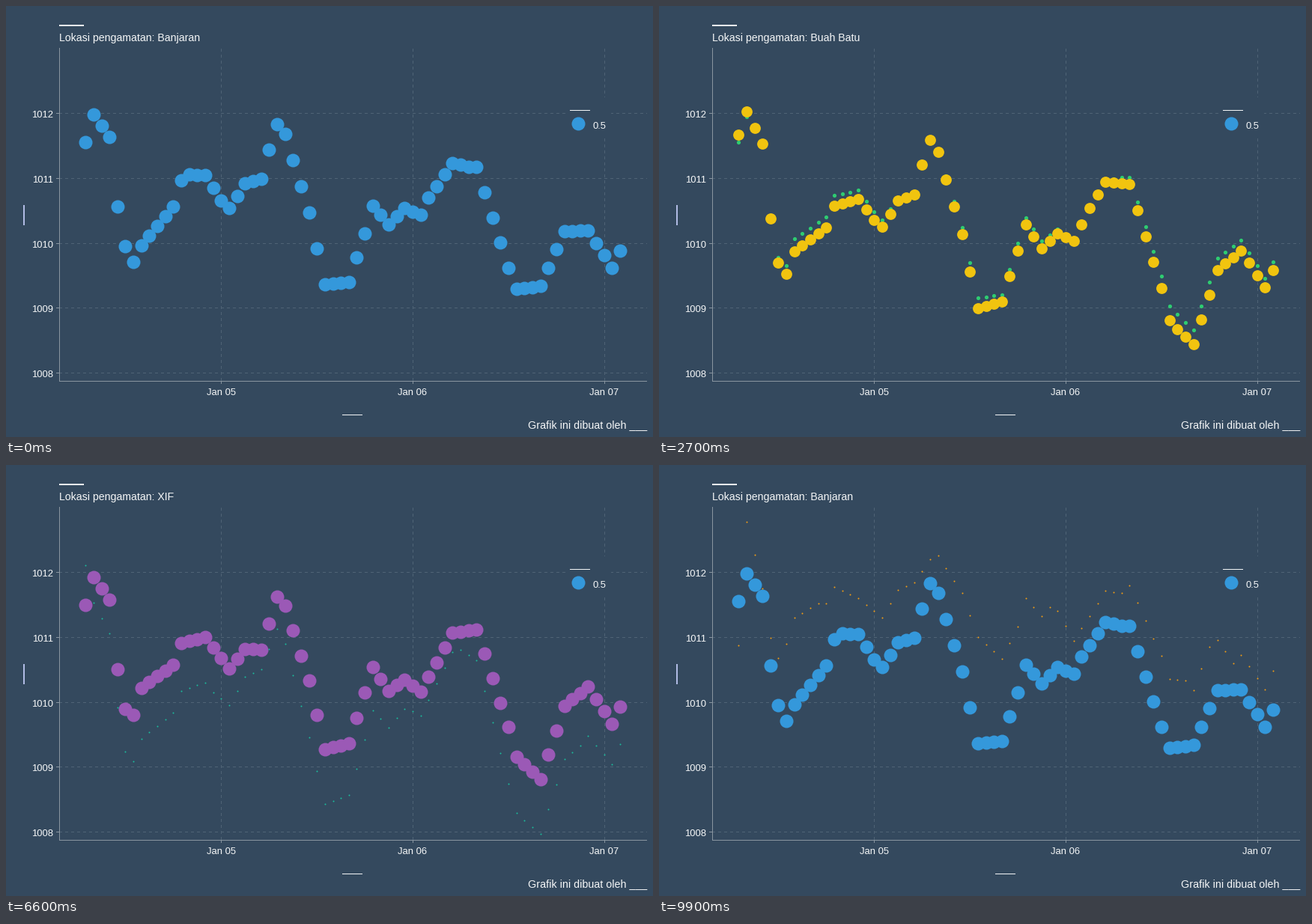
Animation of 864 by 576 pixels, one loop 10000 ms. Source, as a matplotlib script:

```python
import numpy as np
import matplotlib.pyplot as plt
from matplotlib.animation import FuncAnimation
from matplotlib.patches import Rectangle

plt.rcParams["font.family"] = "Liberation Sans"

W, H = 864, 576
FRAMES, STEP = 100, 100
STARTS = [8, 23, 38, 52, 66, 80, 94]  # first frame of each change
CHANGE = 6                            # frames per change
DOT, FULL = 2, 18                     # marker diameters

BG, INK, GRID, AXIS = "#34495e", "#f4f6f7", "#4f6375", "#8995a0"
BLUE = "#3498db"

# Daily pressure swing shared by all stations: hour -> height on the stage
SWING = {0: 187, 1: 150, 3: 180, 4: 273, 5: 326, 6: 334, 7: 298, 11: 267,
         12: 238, 15: 230, 18: 272, 20: 246, 22: 247, 24: 176, 25: 188,
         28: 288, 30: 380, 33: 372, 36: 270, 38: 302, 40: 287, 42: 303,
         46: 224, 49: 220, 53: 350, 54: 390, 57: 420, 60: 322, 63: 296,
         66: 346, 67: 323}

# Name, colour and slow drift away from the shared swing
STATIONS = [
    ("Banjaran", BLUE, {0: -5, 5: -5, 7: 22, 13: -10, 17: 2, 23: -20, 35: 0,
                        43: -27, 48: -6, 53: 0, 57: -46, 63: 4}),
    ("Braga", "#2ecc71", {0: -5, 6: 13, 17: 17, 23: 2, 33: 14, 48: 8, 67: 19}),
    ("Buah Batu", "#f1c40f", {0: -15, 7: 30, 17: 28, 23: 0, 30: 24, 38: 22,
                              44: 6, 55: 32, 67: 30}),
    ("Dago", "#e74c3c", {0: -11}),
    ("XIF", "#9b59b6", {0: 0}),
    ("Lanud", "#1abc9c", {0: -53, 1: 34, 7: 68, 16: 60, 22: 26, 28: 76,
                          34: 68, 41: 34, 47: 24, 53: 76, 62: 70, 67: 50}),
    ("Lembang", "#f39c12", {0: 54, 1: -74, 3: -15, 6: -95, 10: -90, 15: -52,
                            22: -90, 24: -50, 30: -150, 35: -88, 39: -104,
                            42: -68, 48: -50, 56: -122, 59: -112, 62: -40,
                            67: -48}),
]

hours = np.arange(68)


def curve(keys):
    return np.interp(hours, list(keys), list(keys.values()))


def place(drift):
    x = 106.2 + 10.655 * hours
    return np.round(np.column_stack([x, curve(SWING) + curve(drift)]))


points = [place(drift) for _, _, drift in STATIONS]

fig = plt.figure(figsize=(W / 72, H / 72), dpi=72, facecolor=BG)
ax = fig.add_axes([0, 0, 1, 1])
ax.set(xlim=(0, W), ylim=(H, 0))
ax.axis("off")


def line(x0, y0, x1, y1, color, width=1, z=1, **kw):
    ax.plot([x0, x1], [y0, y1], color=color, lw=width, zorder=z, snap=False,
            solid_capstyle="butt", dash_capstyle="butt", **kw)


def label(x, y, text, size, ha="left"):
    return ax.text(x, y, text, size=size, color=INK, ha=ha, va="baseline", zorder=6)


def markers(xy, z):
    return ax.scatter(*np.transpose(xy), s=FULL ** 2, c=BLUE, linewidths=0,
                      antialiased=False, zorder=z)


# Grid, axes and tick labels
dashes = dict(linestyle=(0, (4, 4)))
for i in range(5):
    y = round(143 + 86.8 * i) + 0.5
    line(71, y, 856, y, GRID, **dashes)
    line(67, y, 71, y, AXIS)
    label(63.5, y + 5.5, str(1012 - i), 13, "right")
for i in range(3):
    x = 287.5 + 256 * i
    line(x, 501, x, 56, GRID, **dashes)
    line(x, 502, x, 505, AXIS)
    label(x - 0.5, 520, f"Jan 0{5 + i}", 13, "center")
line(71.5, 56, 71.5, 502, AXIS)
line(71, 501.5, 856, 501.5, AXIS)

# Titles, caption and legend
line(71, 26, 104, 26, INK, 2)
line(449, 546.5, 476, 546.5, INK)
line(24, 266, 24, 293, "#b0bbe4", 2)
label(856, 564, "Grafik ini dibuat oleh ___", 14.25, "right")
ax.add_patch(Rectangle((747, 122), 61, 53, fc=BG, ec="none", zorder=2))
line(753, 139.5, 780, 139.5, INK, z=3)
markers([(764, 157)], 3)
label(784, 164, "0.5", 13)

title = label(71, 47, "", 14.15)
leaving, entering = (markers(points[0], z) for z in (4, 5))


def show(marks, index, scale):
    marks.set_offsets(points[index])
    marks.set_facecolor(STATIONS[index][1])
    marks.set_sizes([(DOT + (FULL - DOT) * scale) ** 2])
    marks.set_visible(True)


def update(frame):
    changes = sum(s <= frame for s in STARTS)
    old, new = changes - 1, changes % len(STATIONS)
    k = frame - STARTS[old] if changes else CHANGE
    t = min(k / (CHANGE - 1), 1)
    show(entering, new, t)
    if k < CHANGE:
        show(leaving, old, 1 - t)
    else:
        leaving.set_visible(False)
    named = old if t < 0.5 else new
    title.set_text(f"Lokasi pengamatan: {STATIONS[named][0]}")
    return leaving, entering, title


anim = FuncAnimation(fig, update, frames=FRAMES, interval=STEP,
                     repeat=True, repeat_delay=0)
plt.show()
```
